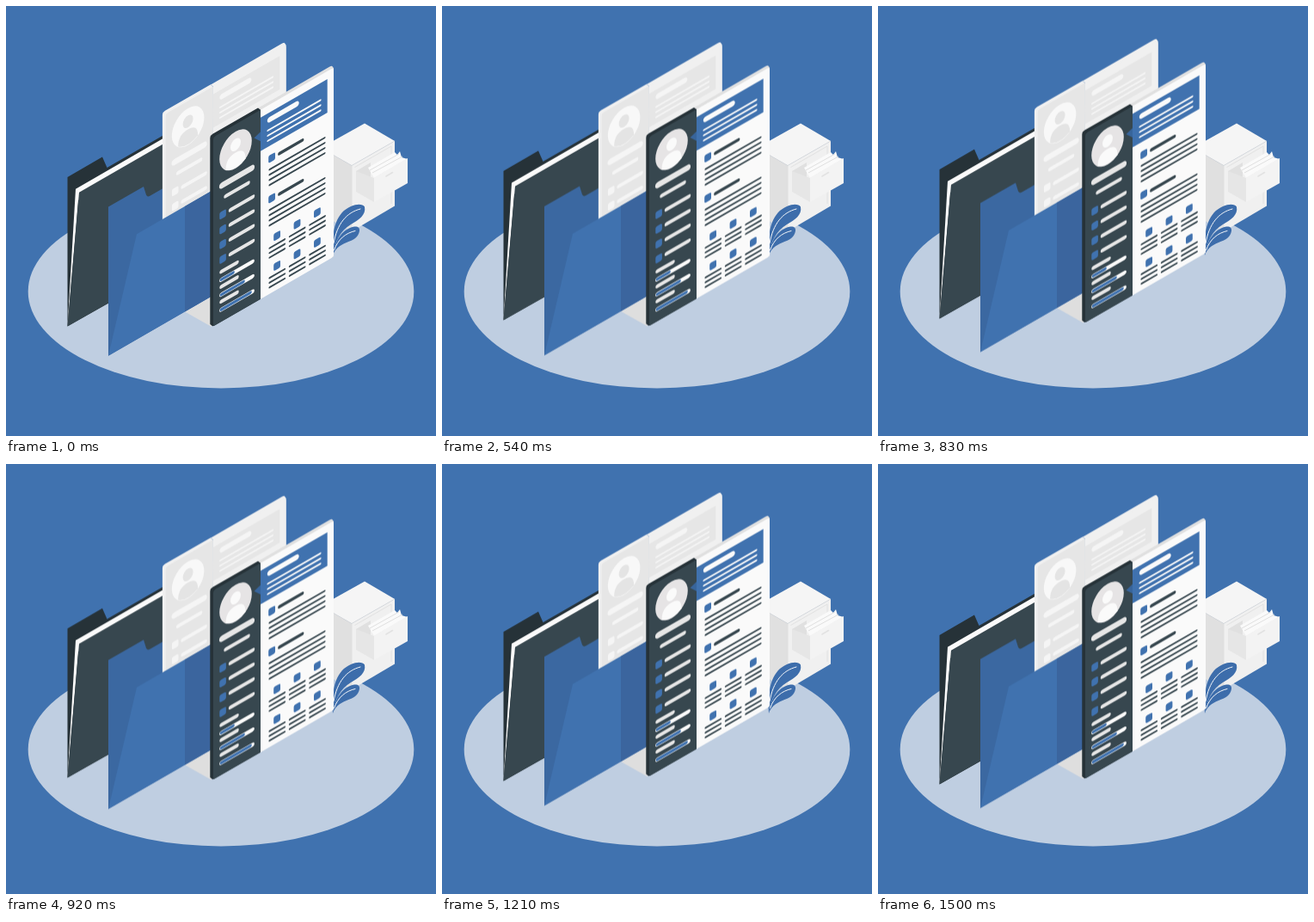
Animation of 500x500 px, one loop 1540 ms. Source, as an HTML page:

```html
<!DOCTYPE html>
<html lang="en">
<head>
<meta charset="utf-8">
<title>Floating folders</title>
<style>
  html, body { margin: 0; width: 100%; height: 100%; overflow: hidden; background: #4072af; }
  svg { display: block; width: 100vw; height: 100vh; }

  .rear  { animation: rear 1540ms linear infinite; }
  .front { animation: front 1540ms linear infinite; }

  /* Same 1.5 s float for both; the front group starts half a second later. */
  @keyframes rear {
    0%, 97.4% { transform: translateY(0); }
    48.7%     { transform: translateY(-10px); }
    100%      { transform: translateY(-.53px); }
  }
  @keyframes front {
    0%, 32.47% { transform: translateY(0); }
    81.17%     { transform: translateY(-10px); }
    100%       { transform: translateY(-6.13px); }
  }

  .resume {
    --side: #263238; --column: #37474f; --edge: #e0e0e0; --page: #fafafa;
    --accent: #4072af; --icon: #4072af; --ink: #37474f; --bar: #e6e6e6;
    --title: #fafafa; --disc: #e6e4e5; --person: #fafafa; --notch: #38659c;
  }
  .copy {
    --side: #f0f0f0; --column: #e6e6e6; --edge: #f0f0f0; --page: #f0f0f0;
    --accent: #e6e6e6; --icon: #f5f5f5; --ink: #e0e0e0; --bar: #f5f5f5;
    --title: #f5f5f5; --disc: #f8f8f8; --person: #e4e4e4; --notch: #e6e6e6;
  }
  .side { fill: var(--side); }
  .column { fill: var(--column); }
  .edge { fill: var(--edge); }
  .page { fill: var(--page); }
  .accent { fill: var(--accent); }
  .icon { fill: var(--icon); }
  .notch { fill: var(--notch); }
  .disc { fill: var(--disc); }
  .person { fill: var(--person); }
  .line { fill: none; stroke-linecap: round; }
  .bar { stroke: var(--bar); }
  .title { stroke: var(--title); }
  .ink { stroke: var(--ink); }
  .level { stroke: var(--accent); }
</style>
</head>
<body>
<svg viewBox="0 0 500 500" preserveAspectRatio="none">
  <defs>
    <g id="contact">
      <rect class="icon" x="248.3" y="245.5" width="7.6" height="8.6" rx="1.8"/>
      <path class="line bar" stroke-width="4.5" d="M261 249.5H287"/>
    </g>
    <g id="skill">
      <path class="line bar" stroke-width="4.5" d="M250.5 315.3H268.5"/>
      <path class="line title" stroke-width="4.8" d="M250.5 324.6H286.5"/>
    </g>
    <g id="section">
      <rect class="accent" x="305.2" y="212.5" width="7.8" height="8.6" rx="1.8"/>
      <path class="line ink" stroke-width="3.8" d="M318 217H344.5"/>
      <path class="line ink" stroke-width="2.1" d="M306.5 229H370.5M306.5 235H370.5M306.5 241H370.5M306.5 247H370.5"/>
    </g>
    <g id="cell">
      <rect class="accent" x="311.2" y="306.7" width="7.8" height="8.6" rx="1.8"/>
      <path class="line ink" stroke-width="2.1" d="M306.5 320.3H324M306.5 325.8H324M306.5 331.3H324"/>
    </g>
    <g id="row">
      <use href="#cell"/>
      <use href="#cell" x="23.4"/>
      <use href="#cell" x="46.8"/>
    </g>

    <!-- Drawn flat, then sheared onto the isometric plane. -->
    <g id="sheet" transform="matrix(1 -.577 0 1 0 138)">
      <path class="edge" d="M293 149.8H376q2.500 0 3.300 1L381 154V373H296V153Z"/>
      <path class="page" d="M296 153.5H378.5q2.5 0 2.5 3V371q0 2.5-2.5 2.5H296Z"/>
      <path class="side" d="M237.3 152.5q0-3 3-3H293L296 153.5V373.5H242.5q-2 0-3-1.5L237.300 369Z"/>
      <path class="column" d="M296 153.5V373.5H243.5q-2.5 0-2.5-2.500V156.500q0-3 3-3Z"/>

      <ellipse class="disc" cx="267" cy="183.4" rx="18.8" ry="21.4"/>
      <ellipse class="person" cx="267" cy="177.3" rx="6" ry="7"/>
      <path class="person" d="M255.5 200C255.5 190 260 186.5 267 186.5S278.5 190 278.5 200Q267 208.5 255.5 200Z"/>
      <path class="line bar" stroke-width="7.2" d="M251.5 215.5H285.5"/>
      <path class="line bar" stroke-width="4.5" d="M255.5 230.5H281.5"/>

      <use href="#contact"/>
      <use href="#contact" y="17.2"/>
      <use href="#contact" y="34.4"/>
      <use href="#contact" y="51.6"/>

      <use href="#skill"/>
      <use href="#skill" y="17.4"/>
      <use href="#skill" y="34.8"/>
      <path class="line level" stroke-width="3.6" d="M250.5 324.6H264M250.5 342H276M250.5 359.4H284"/>

      <rect class="accent" x="296" y="162.5" width="77.7" height="39"/>
      <path class="notch" d="M296 179L288.5 182L296 190Z"/>
      <path class="line title" stroke-width="6.4" d="M307 171H337.5"/>
      <path class="line title" stroke-width="2.1" d="M304.5 182.5H365.5M304.5 188.5H365.5M304.5 194.5H365.5"/>

      <use href="#section"/>
      <use href="#section" y="47"/>
      <use href="#row"/>
      <use href="#row" y="34.7"/>
    </g>
  </defs>

  <rect width="500" height="500" fill="#4072af"/>
  <ellipse cx="250" cy="332" rx="224.3" ry="112.5" fill="#bfcee1"/>

  <g class="cabinet">
    <path fill="#f5f5f5" d="M366 165L417 136.5L452 157L402 185.5Z"/>
    <path fill="#e0e0e0" d="M366 165L402 185.5V262L366 242Z"/>
    <path fill="#f0f0f0" d="M402 185.5L452 157V232.5L402 262Z"/>
    <path fill="none" stroke="#dedede" stroke-width=".8" d="M366 165L402 185.5L452 157M402 185.5V262M405.5 187.5L448 163V230"/>
    <path fill="#e0e0e0" d="M407 192L424 182V225L407 215Z"/>
    <path fill="#e6e6e6" d="M407 192L428 200V228L407 216Z"/>
    <path fill="#fafafa" d="M421 188L452 170L455 173L458 169L460 176L467 178L428 200Z"/>
    <path fill="none" stroke="#e0e0e0" stroke-width="1" d="M423 191L457 172M426 194L461 175"/>
    <path fill="#f3f3f3" d="M428 199.5L464 178.5L467 177V206L428 228Z"/>
    <path fill="none" stroke="#e2e2e2" stroke-width="1.6" stroke-linecap="round" d="M442 198L449.5 193.5"/>
  </g>

  <g class="leaves" fill="#3d6dab">
    <path d="M380 290C378 258 385 240 401 233C409 229.5 415 230.500 417 233.500C419 243 410 249 401 254C389 261 382 274 380 290Z"/>
    <path d="M380 290C382 271 393 258.500 405 256.500C409 256 411.500 257.500 411 261.500C410 269 404 272 396 275C388 278 382 283 380 290Z"/>
    <path fill="none" stroke="#f2f5f9" stroke-width="1" stroke-linecap="round" d="M381 276C385 253 396 240 412 236M381.500 284C386 271 395 264 406 261.500"/>
  </g>

  <g class="rear">
    <path fill="#263238" d="M71.5 199L112 175.5L117.5 188L200 140.4V300L71.5 372.5Z"/>
    <path fill="#fafafa" d="M81 212.8L200 144.1V160L84 226L71.5 372.5Z"/>
    <path fill="#37474f" d="M85 216.8L200 150.4V298.4L71.5 372.5Z"/>
  </g>

  <g class="front">
    <path fill="#3b68a1" d="M119 233.5L160 210L162.5 218Q163.5 222.5 167 221L239 179.5V337.5L119 406.7Z"/>
    <use href="#sheet" class="copy" x="-55.4" y="-27"/>
    <path fill="#dedede" d="M208 355.4L239 337.5V373Z"/>
    <path fill="#4072af" d="M152 265.3L239 215.1V337.5L119 406.7Z"/>
    <path fill="#3b659e" d="M208 233L239 215.1V337.5L208 355.4Z"/>
    <use href="#sheet" class="resume"/>
  </g>
</svg>
</body>
</html>
```
